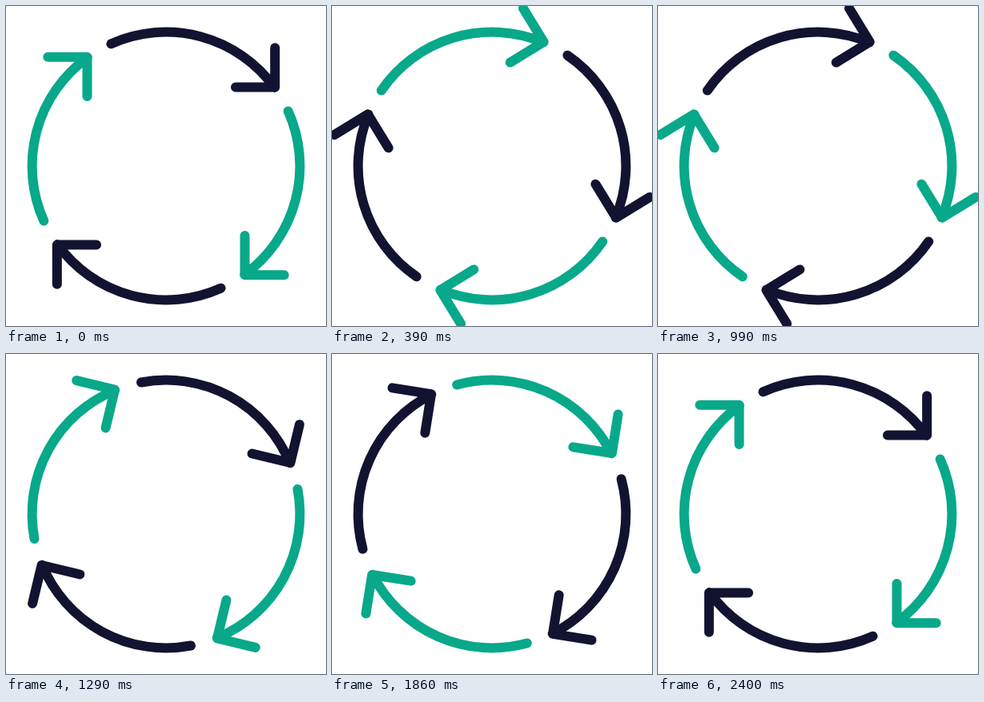
Write an HTML page with a canvas that moves like this. It is 400x400 px and loops after 2430 ms.

```html
<!DOCTYPE html>
<html lang="en">
<head>
<meta charset="utf-8">
<title>Rotating arrows</title>
<style>
  html, body { margin: 0; width: 100%; height: 100%; overflow: hidden; background: #fff; }
  canvas { display: block; width: 400px; height: 400px; }
</style>
</head>
<body>
<canvas id="stage" width="400" height="400"></canvas>
<script>
const ctx = document.getElementById('stage').getContext('2d');
const NAVY = '#121331';
const GREEN = '#08a88a';
const LOOP = 2430;
const STEP = 30;
const STEPS_PER_TURN = 80;
const RADIUS = 167.4;
const TIP = { x: 136.2, y: -98.5 };
const HEAD = 49.2;
const START_ANGLE = -Math.PI / 2 - 0.422;
const END_ANGLE = Math.atan2(TIP.y, TIP.x);

function drawArrow(color) {
  ctx.strokeStyle = color;
  ctx.beginPath();
  ctx.arc(0, 0, RADIUS, START_ANGLE, END_ANGLE);
  ctx.moveTo(TIP.x, TIP.y - HEAD);
  ctx.lineTo(TIP.x, TIP.y);
  ctx.lineTo(TIP.x - HEAD, TIP.y);
  ctx.stroke();
}

function draw(time) {
  const step = Math.floor((time % LOOP) / STEP + 1e-6);
  ctx.setTransform(1, 0, 0, 1, 0, 0);
  ctx.fillStyle = '#fff';
  ctx.fillRect(0, 0, 400, 400);
  ctx.translate(200, 200);
  ctx.rotate(step / STEPS_PER_TURN * Math.PI * 2);
  ctx.lineWidth = 12;
  ctx.lineCap = ctx.lineJoin = 'round';
  for (let i = 0; i < 4; i++) {
    drawArrow(i % 2 ? GREEN : NAVY);
    ctx.rotate(Math.PI / 2);
  }
}

const startTime = performance.now();
function tick() {
  draw(performance.now() - startTime);
  requestAnimationFrame(tick);
}
tick();
</script>
</body>
</html>
```
